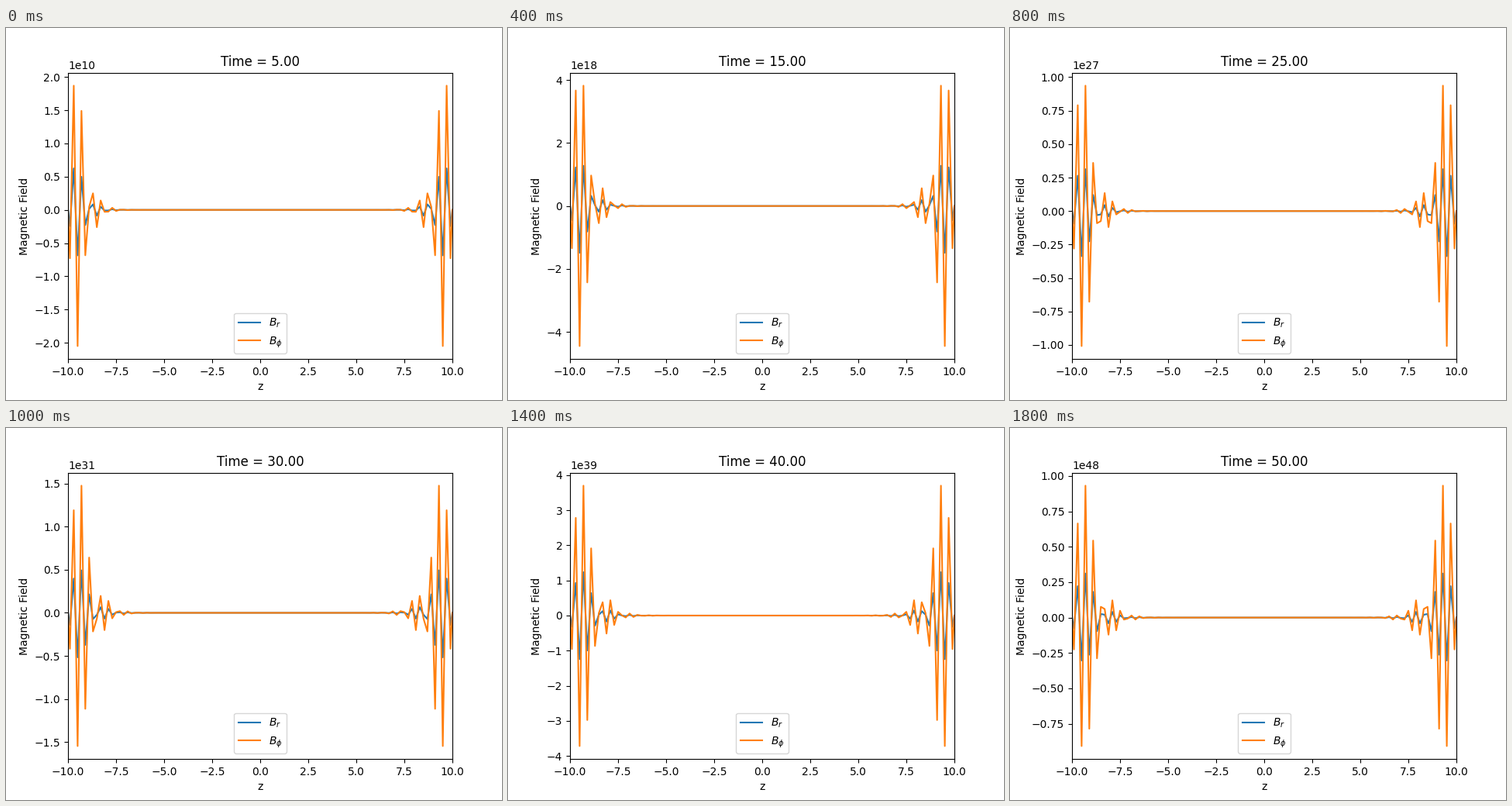
Recreate the animation shown at these times as a matplotlib script. Size 640 by 480 pixels, loop 2 s.

```python
import numpy as np
import matplotlib.pyplot as plt
from matplotlib.animation import FuncAnimation

STEP = 5          # simulated time between frames
FRAMES = 10
RATIO = 0.334     # B_r relative to B_phi
POINTS = 102

# Grid points lie midway in cells of 0.2, plus the two walls
z = np.concatenate([[-10], np.linspace(-9.9, 9.9, POINTS - 2), [10]])
depth = 10 - np.abs(z)
index = np.arange(POINTS)
sign = (-1.0) ** np.minimum(index, index[::-1])


def spread(t):
    """Distance from the wall to the first node of the envelope."""
    return 0.9 + 0.0985 * np.sqrt(t)


def span(t):
    """Peak-to-peak size of B_phi, growing almost exponentially."""
    return 10 ** (6.5162 + 0.84127 * t - 0.0805 * np.log(t))


def b_phi(t):
    """Grid-scale oscillation under a damped wave that widens with time."""
    u = depth / spread(t)
    wave = np.sin(np.pi * u ** 1.22) * np.exp(-1.75 * u - 0.35 * u ** 2)
    field = sign * wave
    return field * span(t) / np.ptp(field)


fig, ax = plt.subplots(figsize=(6.4, 4.8), dpi=100)
line_r, = ax.plot(z, 0 * z, label=r"$B_r$")
line_phi, = ax.plot(z, 0 * z, label=r"$B_\phi$")
ax.set_xlim(-10, 10)
ax.set_xlabel("z")
ax.set_ylabel("Magnetic Field")
ax.legend(loc="lower center")


def draw(i):
    t = STEP * (i + 1)
    field = b_phi(t)
    line_r.set_ydata(RATIO * field)
    line_phi.set_ydata(field)
    margin = 0.05 * np.ptp(field)
    ax.set_ylim(field.min() - margin, field.max() + margin)
    ax.set_title(f"Time = {t:.2f}")
    return line_r, line_phi


anim = FuncAnimation(fig, draw, frames=FRAMES, interval=200, repeat=True,
                     repeat_delay=0, blit=False)
plt.show()
```
